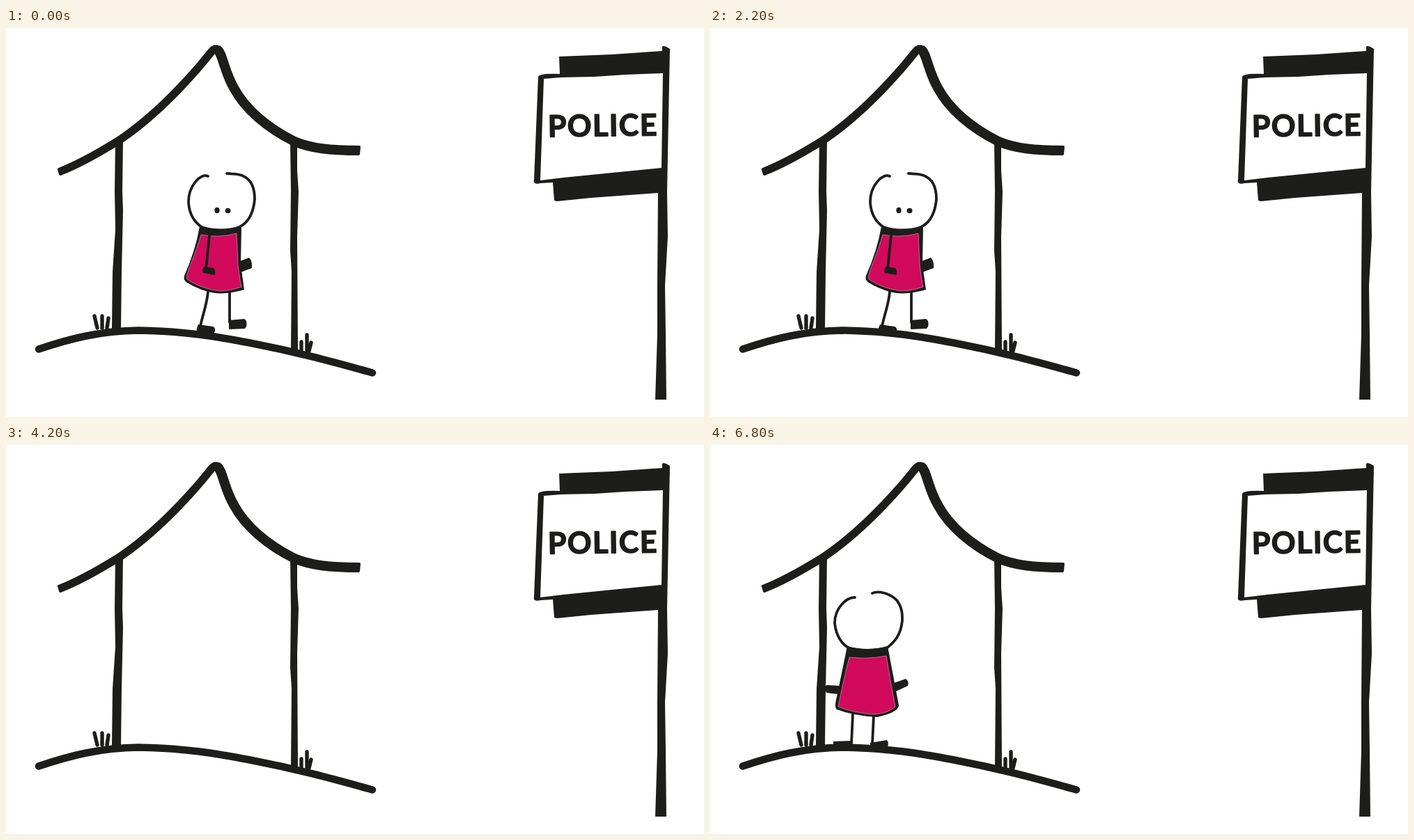
Animation, 1002 px wide and 559 px high, one loop 7000 ms. Source, as an HTML page:

```html
<!DOCTYPE html>
<html lang="en">
<head>
<meta charset="utf-8">
<title>To the police and back</title>
<style>
  html, body { margin: 0; width: 100%; height: 100%; overflow: hidden; background: #fff; }
  svg { display: block; width: 100vw; height: 100vh; }
  .ink { fill: #1d1d1b; }
  .line { fill: none; stroke: #1d1d1b; stroke-width: 3.8; stroke-linecap: round; stroke-linejoin: round; }
  .head { fill: #fff; }
  .pink { fill: #d10a5c; stroke: #fff; stroke-width: .4; }
  .blue { fill: #059fc1; }
  .sign { font: bold 43px Lato, "Open Sans", sans-serif; letter-spacing: 1.4px; stroke: #1d1d1b; stroke-width: 1.5; stroke-linejoin: round; }
  .pose { display: none; }
</style>
</head>
<body>
<svg viewBox="0 0 1002 559" preserveAspectRatio="none">
  <!-- woman standing, side view -->
  <g class="pose" id="stand"><g transform="translate(-309)">
    <path class="line" d="M290 379C288 400 282 412 279 429M321 380V423"/>
    <path class="ink" d="M276 426L297 429Q302 431 299 438L296 441 275 439Q272 434 276 426ZM320 420L342 418Q347 421 345 429L343 432 320 433ZM336 335L349 330Q354 335 353 345L337 351Z"/>
    <path class="line head" d="M290 213C280 208 262 226 262 250C263 270 272 280 281 286C297 292 320 292 335 286C347 280 355 268 357 246C357 230 352 217 339 212C333 209 325 210 317 209"/>
    <path class="ink" d="M278 285Q308 295 338 285L337 340 342 376Q318 383 300 381Q280 378 260 366Q254 362 256 356Q272 320 278 285Z"/>
    <path class="pink" d="M280 297Q306 302 331 295L333 340Q336 365 338 372Q316 380 300 377Q275 372 260 361Q258 358 264 342Q275 315 280 297Z"/>
    <path class="line" d="M292 298L287 347"/>
    <path class="ink" d="M284 343L298 345Q301 348 300 355L283 352Q281 347 284 343Z"/>
    <ellipse class="ink" cx="303" cy="262" rx="3.6" ry="4.2"/>
    <ellipse class="ink" cx="318.500" cy="262.500" rx="4" ry="3.8"/>
  </g></g>

  <!-- woman in mid-step, side view -->
  <g class="pose" id="step"><g transform="translate(-447.500)">
    <path class="line" d="M432 403Q414 413 399 429M452 404C450 425 453 440 452 460"/>
    <path class="ink" d="M388 431L398 425 409 448 399 453ZM450 459L475 460Q478 464 476 472L470 475 450 470ZM476 374L492 373Q494 378 492 385L477 384Z"/>
    <path class="line head" d="M436 241C420 242 398 258 396 282C397 300 404 308 416 314C430 318 455 318 472 313C485 308 500 300 499 285C497 262 482 245 459 243"/>
    <path class="ink" d="M412 312Q442 319 473 311L475 345 483 401Q440 412 390 396Q392 385 402 360Q411 335 412 312Z"/>
    <path class="pink" d="M415 323Q440 331 466 324L468 350 478 399Q440 407 394 393Q412 360 415 323Z"/>
    <path class="line" d="M426 325L424 379"/>
    <ellipse class="ink" cx="428" cy="384.500" rx="8.500" ry="7"/>
    <circle class="ink" cx="452" cy="287" r="3.2"/>
    <ellipse class="ink" cx="467.500" cy="284" rx="4" ry="3.2"/>
  </g></g>

  <!-- woman from behind -->
  <g class="pose" id="back"><g transform="translate(-228)">
    <path class="line" d="M205 386L203 430M235 388L233 430"/>
    <path class="ink" d="M177 426L203 425V434H177ZM230 428L254 424Q257 428 255 434L250 437 230 433ZM186 346L167 345Q164 350 167 356L183 358ZM264 342L281 336Q286 340 284 346L267 354Z"/>
    <path class="line head" d="M208 219C195 219 179 235 179 256C181 275 190 287 200 292C215 296 240 296 255 291C263 284 274 275 276 252C276 245 277 235 268 223C258 213 242 209 233 213"/>
    <path class="ink" d="M197 289Q226 297 255 289L271 374Q271 384 240 391Q205 389 182 380Q178 377 182 362Z"/>
    <path class="pink" d="M200 305Q228 308 253 303Q260 345 266 376Q255 386 235 387Q205 385 184 376Q190 345 200 305Z"/>
  </g></g>

  <!-- officer -->
  <g class="pose" id="officer">
    <path class="line" d="M813 468L814 523M836 468L837 522"/>
    <path class="ink" d="M795 524L817 522 818 532 795 535Q792 529 795 524ZM822 525L839 520Q843 526 841 533L822 534ZM774 427Q781 425 788 432L786 440 775 435Z"/>
    <path class="line head" d="M778 322C768 335 770 352 785 364C804 378 848 381 866 368C880 355 878 340 873 328"/>
    <path class="ink" d="M790 370Q822 384 852 377L868 463 867 468Q830 474 785 464Q780 462 782 458Q790 420 790 370Z"/>
    <path class="blue" d="M797 380Q820 387 846 383L864 463Q830 469 786 460Q796 420 797 380Z"/>
    <path class="line blue" d="M793 376L786 398 790 402 798 383M831 384L833 417Q842 423 851 419L849 381"/>
    <path class="line" d="M813 382L814 468M796 379L808 395 813 384 820 397 835 382M843 421L841 437"/>
    <path class="ink" d="M831 438L845 433Q847 440 845 446L833 447Q829 443 831 438Z"/>
    <g class="ink">
      <circle cx="803" cy="408" r="3.800"/><circle cx="803" cy="430" r="3.800"/><circle cx="801" cy="451" r="3.800"/>
      <ellipse cx="801" cy="349" rx="3.200" ry="3.800"/><circle cx="814.500" cy="350.500" r="4"/>
    </g>
    <path class="ink" d="M787 260Q800 262 806 258L821 250Q830 262 842 268Q855 269 866 263Q870 279 880 283L896 287Q884 300 880 318L871 331Q820 335 778 322Q772 317 775 309Q781 302 798 303Q796 275 787 260Z"/>
    <path class="blue" d="M799 300Q830 317 870 320L868 324Q825 320 798 304Z"/>
  </g>

  <!-- house and hill -->
  <g class="line">
    <path style="stroke-width:11.5;stroke-linecap:butt" d="M77 206.500C112 193 145 172 163 161C215 126 265 72 295 34Q302 26 307 34"/>
    <path style="stroke-width:14;stroke-linecap:butt" d="M303 31C311 36 313 62 327 86C343 116 374 143 414 163C438 173 465 176 507 176"/>
    <path style="stroke-width:4" d="M76 203L78 210M507 171L506 181"/>
    <path style="stroke-width:10.500" d="M47 461.500C90 447 135 435 190 434.500C260 436 300 443 350 452.500C420 466 470 480 526 495.500"/>
    <path style="stroke-width:5.400" d="M127 414L131 431M138 414V431M147 417L145 431M424 451V464M432 441V463M438 452L435 464"/>
  </g>
  <path class="ink" d="M157 160H168L167 235 168 262 166 350 165 432H152L153 350 157 290 156 235ZM408 162H418L418 205 420 235 418 300 419 462H409L410 350 408 320 409 235Z"/>

  <!-- flag sign -->
  <path class="ink" d="M942 27Q944 24 953 30L951 130 949 235 950 300 946 370 947 440 948 534H932L935 440 935 370 936 237 840 244 791 249 787 248 785 222 768 223Q756 226 758 218L764 70Q766 65 795 66L794 41 870 38 942 33Z"/>
  <path fill="#fff" d="M772 73L797 71 845 70 890 67 943 65 941 201 870 208 800 215 767 219Z"/>
  <text class="ink sign" x="778" y="156.500" transform="rotate(-.8 778 156.500)">POLICE</text>
</svg>
<script>
  const TICK = 200, TICKS = 35;
  const poses = { s: 'stand', w: 'step', b: 'back' };

  // [pose, centre x, y shift]; a capital letter faces left
  const woman = [
    ['s', 309, 0], ['w', 356, -23], ['b', 345, 8], ['S', 335, 8], ['W', 312, -27], ['S', 290, 3], ['W', 267, -32],
    ['S', 243, 1], ['W', 221, -39], ['b', 228, 0], ['w', 232, -36], ['s', 277, 0], ['w', 324, -28],
    ['s', 384, 16], ['w', 447.5, 0], ['s', 534, 43], ['w', 621, 28], ['s', 708, 83], ['s', 708, 83],
    ['w', 702, 45], ['s', 770, 83],
    , , , , ,
    ['S', 740, 83], ['S', 725, 83], ['W', 707.5, 40], ['S', 635, 64], ['W', 563, 14], ['W', 491, 0],
    ['S', 403, 22], ['W', 315, -31], ['b', 228, 0]
  ];

  // tick: [x shift, y shift]
  const officer = { 16: [67, 0], 17: [33, 0], 18: [0, 0], 19: [18, 0], 20: [36, 0], 26: [21, -7], 27: [0, 0] };

  const all = document.querySelectorAll('.pose');
  let shown = -1;

  function place(id, x, y, side = 1) {
    const el = document.getElementById(id);
    el.style.display = 'inline';
    el.setAttribute('transform', `translate(${x} ${y}) scale(${side} 1)`);
  }

  function draw(tick) {
    all.forEach(el => el.style.display = 'none');
    if (woman[tick]) {
      const [key, x, y] = woman[tick], pose = key.toLowerCase();
      place(poses[pose], x, y, key === pose ? 1 : -1);
    }
    if (officer[tick]) place('officer', ...officer[tick]);
  }

  const start = performance.now();
  function loop() {
    const tick = Math.floor((performance.now() - start) / TICK) % TICKS;
    if (tick !== shown) draw(shown = tick);
    requestAnimationFrame(loop);
  }
  loop();
</script>
</body>
</html>
```
